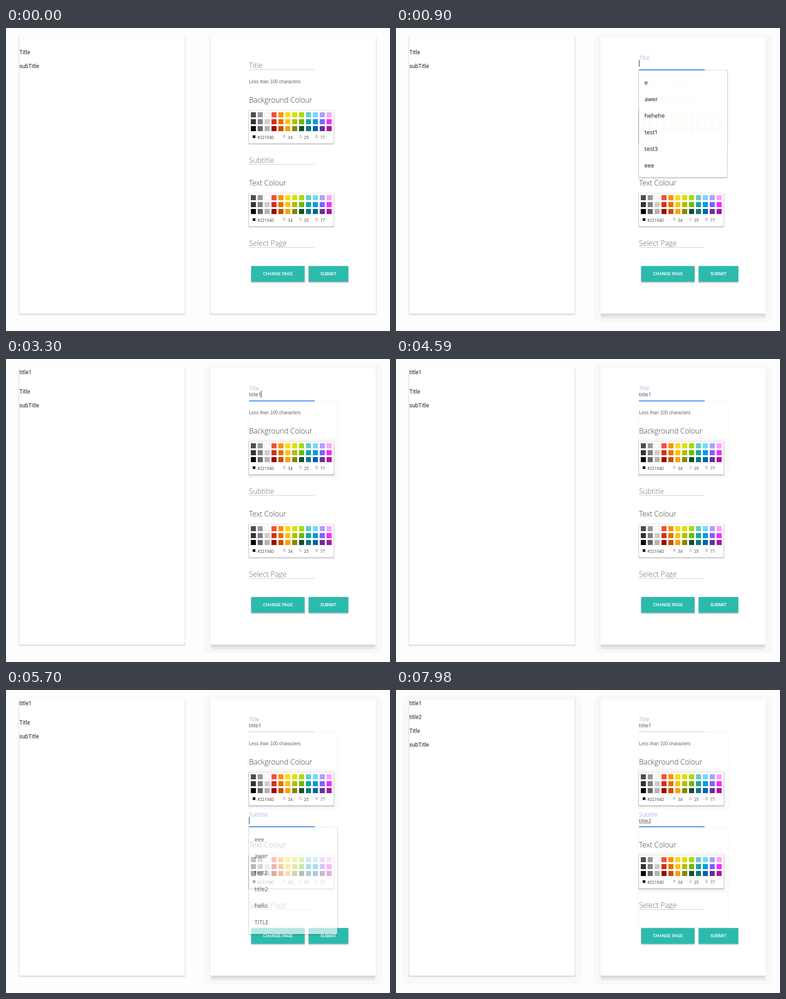
An HTML page that plays this animation: 836 by 658 pixels, repeating every 8 s.

```html
<!DOCTYPE html>
<html lang="en">
<head>
<meta charset="utf-8">
<title>Page form</title>
<style>
  html, body { margin: 0; width: 100%; height: 100%; overflow: hidden; background: #fdfdfd; }
  svg { display: block; width: 836px; height: 658px; }
  text { white-space: pre; }
  .preview { font: 12px Roboto, sans-serif; fill: #222; }
  .label { font-family: "Open Sans", sans-serif; font-weight: 300; }
  .head { font: 300 16px "Open Sans", sans-serif; fill: #3c3c3c; }
  .value { font: 11.4px "Open Sans", sans-serif; fill: #444; }
  .item { font: 12.5px "Open Sans", sans-serif; fill: #111; }
  .tip { font: 11.4px "Open Sans", sans-serif; fill: #222; }
  .hint { font: 10px "Liberation Sans", Arial, sans-serif; fill: #666; }
  .code { font: 9px Roboto, sans-serif; fill: #555; }
  .channel { font: 9px Roboto, sans-serif; fill: #999; }
  .button { font: 500 9.7px Roboto, sans-serif; fill: #fff; text-anchor: middle; }
</style>
</head>
<body>
<svg id="stage" viewBox="0 0 836 658" xmlns="http://www.w3.org/2000/svg"></svg>
<script>
const LOOP = 8000;
const stage = document.getElementById('stage');

const swatches = [
  '4D4D4D 999999 FFFFFF F44E3B FE9200 FCDC00 DBDF00 A4DD00 68CCCA 73D8FF AEA1FF FDA1FF',
  '333333 808080 CCCCCC D33115 E27300 FCC400 B0BC00 68BC00 16A5A5 009CE0 7B64FF FA28FF',
  '000000 666666 B3B3B3 9F0500 C45100 FB9E00 808900 194D33 0C797D 0062B1 653294 AB149E'
].map(row => row.split(' '));

const titleText = [[0, ''], [2460, 'tit'], [2550, 'titl'], [2820, 'title'], [3300, 'title1']];
const subText = [[0, ''], [5790, 't'], [5880, 'ti'], [5940, 'tit'], [6000, 'titl'], [6060, 'title'], [6480, 'title2']];
const titleList = [
  [0, ''], [750, 'e awer hehehe test1 test3 eee'], [2460, 'title2 tit TITLE Title'],
  [2550, 'title2 TITLE Title'], [3300, '']
];
const subList = [
  [0, ''], [5610, 'eee awer test2 title2 hello TITLE'], [5790, 'test2 title2 TITLE'],
  [5880, 'title2 TITLE'], [6450, '']
];
const titleCaret = [[0, 0], [750, 1], [1260, 0], [1770, 1], [3810, 0], [4320, 1], [4590, 0]];
const subCaret = [[0, 0], [4650, 1], [5160, 0], [5610, 1], [6990, 0], [7440, 1], [7980, 0]];
const hovered = [[0, 'none'], [240, 'right'], [6930, 'left'], [7170, 'right']];

const at = (t, keys) => keys.reduce((value, key) => t >= key[0] ? key[1] : value, keys[0][1]);
const ramp = (t, start, end) => Math.min(1, Math.max(0, (t - start) / (end - start)));
const easeOut = p => 1 - (1 - p) ** 3;
const mix = (a, b, p) => a + (b - a) * p;
const blend = (a, b, p) => `rgb(${a.map((v, i) => Math.round(mix(v, b[i], p)))})`;

const rect = (x, y, w, h, fill, more = '') =>
  `<rect x="${x}" y="${y}" width="${w}" height="${h}" fill="${fill}" ${more}/>`;
const text = (x, y, kind, str, more = '') => `<text x="${x}" y="${y}" class="${kind}" ${more}>${str}</text>`;

// Stacked translucent boxes: [side growth, top growth, bottom growth, alpha]
const shadow = (x, y, w, h, layers) => layers.map(([side, top, bottom, alpha]) =>
  rect(x - side, y - top, w + 2 * side, h + top + bottom, '#000', `opacity="${alpha}" rx="${2 + Math.max(0, side)}"`)).join('');

const REST = [[2, 1, 4, .035], [1, 0, 2.5, .06], [.5, 0, 1, .1]];
const LIFTED = [[-3, 0, 11, .035], [-1, 0, 8, .04], [0, 0, 4, .05], [1, 0, 1, .07]];
const RAISED = [[2, 1, 4, .05], [1, 0, 2.5, .1], [.5, .5, 1, .14]];

function card(x, lifted, halo) {
  return (halo ? rect(x - 13, 12, 387, 627, '#f8f8f8', 'rx="15"') : '') +
    shadow(x, 20, 361, 600.5, lifted ? LIFTED : REST) + rect(x, 20, 361, 600.5, '#fff', 'rx="2"');
}

function palette(y) {
  let out = shadow(529, y, 184.5, 71.5, RAISED) + rect(529, y, 184.5, 71.5, '#fff', 'rx="2"');
  swatches.forEach((row, r) => row.forEach((color, c) => {
    const px = 533 + 15 * c, py = y + 4 + 15 * r;
    out += color === 'FFFFFF'
      ? rect(px + .5, py + .5, 10, 10, '#fff', 'stroke="#e2e2e2"')
      : rect(px, py, 11, 11, '#' + color);
  }));
  out += rect(537, y + 54, 6, 6, '#22194D') + text(547, y + 62, 'code', '#22194D');
  [['R', 603, 34], ['G', 638, 25], ['B', 673.5, 77]].forEach(([name, x, n]) => {
    out += text(x, y + 60, 'channel', name) + text(x + 10.7, y + 62, 'code', n);
  });
  return out;
}

function button(x, w, label) {
  return shadow(x, 517, w, 34, RAISED) + rect(x, 517, w, 34, '#2bbbad', 'rx="1"') +
    text(x + w / 2, 537, 'button', label);
}

const form = text(529, 120, 'hint', 'Less than 100 characters') +
  text(529, 162, 'head', 'Background Colour') + palette(179) +
  text(529, 342, 'head', 'Text Colour') + palette(359) +
  text(529, 473, 'label', 'Select Page', 'font-size="16" fill="#6c6c6c"') +
  rect(529, 476, 143, 1, '#c6cace') +
  button(534, 116, 'CHANGE PAGE') + button(659, 86, 'SUBMIT');

// y is the underline; lift is the label's rise, focus the strength of the accent
function field(name, y, lift, focus, accent, value, caret, squiggle) {
  const base = y - mix(3, y < 200 ? 22 : 21, lift);
  const idle = lift > .5 ? [153, 143, 143] : [115, 115, 115];
  const fill = blend(idle, accent, focus);
  let out = text(529, base, 'label', name, `font-size="${mix(16, 12, lift)}" fill="${fill}"`) +
    rect(529, y, 143, 1, '#c6cace') +
    rect(529, y, 143, 2, '#4285f4', `opacity="${focus}"`);
  const top = y < 200 ? 69 : 276;
  if (value) out += text(529, top + 12, 'value', value);
  if (caret) out += rect(529 + caretOffset(value), top, 1, 15, '#111');
  if (squiggle) {
    let d = `M529 ${top + 14.5}`;
    for (let i = 1; i <= 13; i++) d += `L${529 + 2 * i} ${top + 13 + (i % 2 ? 0 : 1.5)}`;
    out += `<path d="${d}" fill="none" stroke="#e0453c" stroke-width=".9"/>`;
  }
  return out;
}

function caretOffset(value) {
  const advance = { t: 4, i: 2.9, l: 2.9, e: 6.3 };
  return Math.round([...value].reduce((sum, ch) => sum + (advance[ch] || 6.3), 0));
}

function dropdown(y, list, alpha) {
  if (!list) return '';
  const items = list.split(' '), h = 16 + 36 * items.length;
  return `<g opacity="${alpha}">` + shadow(529, y, 192, h, RAISED) +
    rect(529, y, 192, h, '#fff', 'rx="2"') +
    items.map((item, i) => text(541, y + 31 + 36 * i, 'item', item)).join('') + '</g>';
}

const trace = (y, h, band) => rect(527, y, 196, h, '#fff', 'stroke="#f8f8f8" stroke-width="2" rx="3"') +
  rect(526, band, 193, 86, '#f8f8f8', 'rx="5"');

function preview(title, sub) {
  let out = title ? text(29, 33, 'preview', title) : '';
  if (sub) out += text(29, 63, 'preview', sub);
  const y = sub ? 93 : title ? 75 : 57;
  return out + text(29, y, 'preview', 'Title') + text(29, y + 30, 'preview', 'subTitle');
}

function draw(t) {
  const title = at(t, titleText), sub = at(t, subText), over = at(t, hovered);
  const titleFocus = ramp(t, 740, 860) * (1 - ramp(t, 4600, 4860));
  const subFocus = ramp(t, 4620, 4800);
  const titleAccent = t < 990 ? [115, 165, 240] : [147, 140, 232];

  stage.innerHTML =
    card(28.5, over === 'left', t >= 6930) + card(444.5, over === 'right', t >= 240) +
    (t >= 750 ? trace(92, 165, 172) : '') + (t >= 5610 ? trace(298, 217, 353) : '') +
    preview(title, sub) + form +
    field('Title', 90, easeOut(ramp(t, 740, 990)), titleFocus, titleAccent, title,
      at(t, titleCaret), t >= 4260 && t < 4590) +
    field('Subtitle', 296, easeOut(ramp(t, 4600, 4890)), subFocus, [147, 140, 232], sub,
      at(t, subCaret), t >= 7470) +
    dropdown(92, at(t, titleList), .975 * ramp(t, 740, 890)) +
    dropdown(298, at(t, subList), .975 * ramp(t, 5600, 5750)) +
    (t >= 5220 && t < 5610
      ? rect(577.5, 300.5, 137, 24, '#fff', 'stroke="#222"') + text(585, 317, 'tip', 'Please fill out this field.')
      : '');
}

function tick() {
  draw(performance.now() % LOOP);
  requestAnimationFrame(tick);
}
tick();
</script>
</body>
</html>
```
